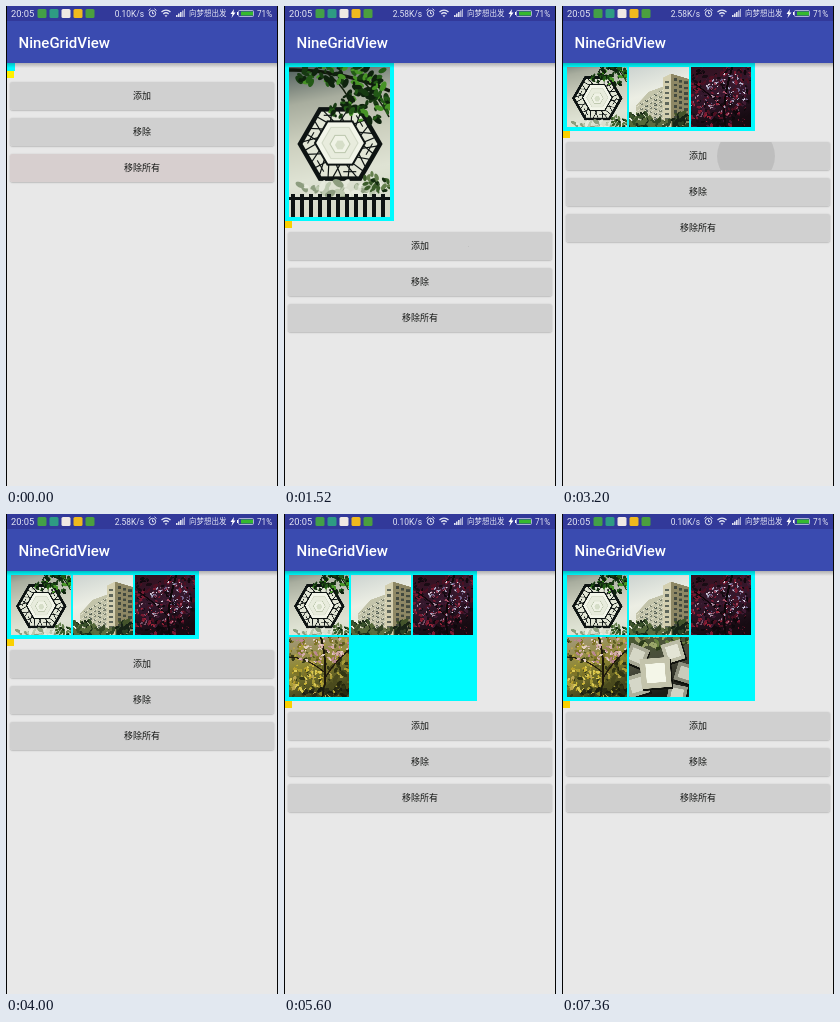
Recreate the animation shown at these times as an HTML page with a canvas. Size 272 px wide and 480 px high, loop 8 s.

```html
<!DOCTYPE html>
<html lang="zh">
<head>
<meta charset="utf-8">
<title>NineGridView</title>
<style>
  html, body { margin: 0; width: 100%; height: 100%; overflow: hidden; background: #e8e8e8; }
  #stage { position: relative; width: 272px; height: 480px; overflow: hidden; background: #e8e8e8;
    font-family: Roboto, "Noto Sans CJK SC", "Noto Sans CJK", sans-serif; }
  #stage > * { position: absolute; }
  #bars { left: 0; top: 0; z-index: 2; }
  #shade { top: 57px; width: 272px; height: 5px; z-index: 1;
    background: linear-gradient(rgba(0,0,0,.24), rgba(0,0,0,0)); }
  #grid { left: 1px; top: 57px; background: #00fbff; }
  #grid canvas { position: absolute; object-fit: cover; }
  #marker { left: 1px; width: 7px; height: 7px; }
  #buttons { left: 4px; width: 264px; }
  .lift { height: 28px; margin-bottom: 8px; border-radius: 2px; box-shadow: 0 .5px 1.5px rgba(0,0,0,.3); }
  .button { position: relative; height: 28px; border-radius: 2px; overflow: hidden;
    background: #d0d0d0; color: #141614; font-size: 9px; line-height: 28px; text-align: center; }
  #ripple { position: absolute; border-radius: 50%; background: #000; }
  .edge { top: 0; width: 1px; height: 480px; background: #050505; z-index: 3; }
</style>
</head>
<body>
<div id="stage">
  <svg id="bars" width="272" height="57" fill="#fff">
    <rect width="272" height="15" fill="#32399a"/>
    <rect y="15" width="272" height="42" fill="#3a4bb0"/>
    <text x="12.500" y="41.500" font-size="15" font-weight="500">NineGridView</text>
    <g fill="#e4e6f4">
      <text x="5" y="10.600" font-size="9.300">20:05</text>
      <text id="speed" x="138" y="10.500" font-size="8.400" text-anchor="end"></text>
      <text x="183" y="10.300" font-size="7.500">向梦想出发</text>
      <text x="251" y="10.500" font-size="8.200">71%</text>
    </g>
    <g id="badges"></g>
    <g fill="none" stroke="#dfe2f2">
      <circle cx="146.500" cy="7.500" r="3.200"/>
      <path d="M146.500 5.500v2.200h1.500M142.500 4.500l2-1.700M150.500 4.500l-2-1.700"/>
      <path d="M155.500 6a6.500 6.500 0 0 1 9 0M157.300 8a4 4 0 0 1 5.400 0" stroke-width="1.300"/>
      <rect x="232.500" y="4.500" width="15" height="6" rx="1" opacity=".7"/>
    </g>
    <path d="M158.500 9.300h3l-1.500 2zM170 9h1.600v2H170zM172 7.500h1.600V11H172zM174 6h1.600v5H174z" opacity=".85"/>
    <path d="M176 4.500h1.600V11H176zM178 3h1v8h-1z" opacity=".6"/>
    <path d="M228 3l-3.500 5h2l-1 4 4-5.500h-2z"/>
    <path d="M235 5.500h12v4h-12z" fill="#35b92f"/>
    <path d="M231 6h1v3h-1z"/>
  </svg>
  <div id="shade"></div>
  <div id="grid"></div>
  <div id="marker"></div>
  <div id="buttons">
    <div class="lift"><div class="button"><div id="ripple"></div>添加</div></div>
    <div class="lift"><div class="button">移除</div></div>
    <div class="lift"><div class="button" id="clear">移除所有</div></div>
  </div>
  <div class="edge" style="left:0"></div>
  <div class="edge" style="left:271px"></div>
</div>
<script>
const LOOP = 8000, PAD = 4, GAP = 2, TOP = 57;
const $ = id => document.getElementById(id);

// Each tap: when the grid changes, when its ripple starts, where, and the ripple's first radius
const TAPS = [
  { at: 80, ripple: 80, x: 180, r: 0 },
  { at: 1600, ripple: 1520, x: 180, r: 0 },
  { at: 3120, ripple: 3120, x: 180, r: 0 },
  { at: 4720, ripple: 4800, x: 180, r: 0 },
  { at: 6400, ripple: 6400, x: 180, r: 250 }
];

['#43a047', '#2e9b83', '#f0e9e4', '#efb91e', '#4b9f3e'].forEach((color, i) => {
  $('badges').insertAdjacentHTML('beforeend',
    `<rect x="${31.5 + 12 * i}" y="3" width="9" height="9" rx="1.500" fill="${color}"/>`);
});

function seeded(seed) {
  return () => {
    seed = (seed * 1664525 + 1013904223) >>> 0;
    return seed / 4294967296;
  };
}

function painter(w, h, seed) {
  const canvas = document.createElement('canvas');
  canvas.width = w * 2;
  canvas.height = h * 2;
  const g = canvas.getContext('2d'), rnd = seeded(seed);
  g.scale(2, 2);
  const p = {
    canvas, g,
    poly(points, fill, stroke, width = 1) {
      g.beginPath();
      points.forEach(([x, y]) => g.lineTo(x, y));
      g.closePath();
      if (fill) { g.fillStyle = fill; g.fill(); }
      if (stroke) { g.strokeStyle = stroke; g.lineWidth = width; g.stroke(); }
    },
    rect(x, y, w, h, fill) { g.fillStyle = fill; g.fillRect(x, y, w, h); },
    wash(...colors) {
      const fade = g.createLinearGradient(0, 0, w * .3, h);
      colors.forEach((c, i) => fade.addColorStop(i / (colors.length - 1), c));
      p.rect(0, 0, w, h, fade);
    },
    curve(x, y, cx, cy, ex, ey, color, width) {
      g.beginPath();
      g.moveTo(x, y);
      g.quadraticCurveTo(cx, cy, ex, ey);
      g.strokeStyle = color;
      g.lineWidth = width;
      g.stroke();
    },
    leaves(n, x, y, rx, ry, size, colors) {
      for (let i = 0; i < n; i++) {
        const a = rnd() * Math.PI * 2, d = Math.sqrt(rnd()), s = size * (.5 + rnd());
        g.fillStyle = colors[Math.floor(rnd() * colors.length)];
        g.beginPath();
        g.ellipse(x + Math.cos(a) * d * rx, y + Math.sin(a) * d * ry, s, s * .55, rnd() * 3, 0, 7);
        g.fill();
      }
    }
  };
  return p;
}

const hexagon = (x, y, r) => Array.from({ length: 6 }, (_, i) =>
  [x + r * Math.cos(i * Math.PI / 3), y + r * Math.sin(i * Math.PI / 3)]);

function latticeWindow() {
  const p = painter(101, 150, 7), ink = '#0d1312', greens = ['#0e220d', '#235a17', '#479426', '#173a12'];
  p.wash('#4f5d5b', '#a9ae9f', '#cdd0bf', '#dfe3d4', '#d5dac8');
  const outer = hexagon(51, 77, 40), inner = hexagon(51, 76, 25);
  p.poly(outer, '#e2e6d6', ink, 4.5);
  const mix = (u, v, k) => [u[0] + (v[0] - u[0]) * k, u[1] + (v[1] - u[1]) * k];
  outer.forEach((a, i) => {
    const b = outer[(i + 1) % 6], c = inner[i], d = inner[(i + 1) % 6];
    [[.05, .25], [.3, .12], [.45, .65], [.7, .5], [.8, .95]].forEach(([s, e]) =>
      p.poly([mix(a, b, s), mix(c, d, e)], null, ink, 1.2));
    p.poly([mix(a, c, .5), mix(mix(a, b, .4), mix(c, d, .4), .5)], null, ink, 1.1);
  });
  p.poly(inner, '#f2f5e9', ink, 2);
  p.poly(hexagon(51, 76, 18), '#e8ecdd', '#d2d9c6', 1);
  p.poly(hexagon(51, 77, 10), '#f0f3e6', '#bcc7ad', 1);
  p.poly(hexagon(51, 78, 5), '#d6dec8');
  p.leaves(45, 50, 121, 50, 7, 4, ['#bcc8ae', '#e6eadc', '#8d9d7f']);
  p.rect(0, 130, 101, 3, ink);
  for (let x = 2; x < 101; x += 9) p.rect(x, 127, 4, 23, ink);
  p.curve(0, 3, 50, 2, 101, 24, '#10180c', 3.5);
  p.curve(35, 4, 60, 22, 62, 42, '#14200f', 1.5);
  p.curve(70, 10, 90, 30, 100, 50, '#14200f', 1.5);
  p.leaves(60, 50, 8, 52, 10, 3.5, greens);
  p.leaves(85, 78, 32, 26, 24, 3.6, greens);
  p.leaves(22, 53, 42, 14, 8, 3, greens);
  p.leaves(30, 88, 115, 15, 10, 2.6, ['#3b5c2a', '#142c10', '#65804d']);
  return p.canvas;
}

function building() {
  const p = painter(90, 90, 21);
  p.wash('#ccd3d0', '#eceee4', '#e3e5d6');
  p.poly([[11, 57], [30, 37], [52, 29], [52, 90], [11, 90]], '#c3c4aa');
  p.poly([[51, 16], [63, 10], [63, 90], [51, 90]], '#d3cfb0');
  p.poly([[63, 10], [90, 18], [90, 90], [63, 90]], '#8e8865');
  for (let y = 0; y < 8; y++) {
    for (let x = 0; x < 5; x++) p.rect(17 + x * 7, 54 - x * 4.5 + y * 7, 4, 3.5, x % 2 ? '#5a6457' : '#7b8270');
    p.rect(54, 21 + y * 8, 6, 3.5, '#5e665b');
    for (let x = 0; x < 3; x++) p.rect(67 + x * 8, 17 + x * 2.3 + y * 8, 5, 4, '#434a3f');
    p.poly([[11, 60 + y * 7], [52, 34 + y * 7]], null, '#e3e2cd', .8);
  }
  p.leaves(75, 12, 81, 22, 14, 4, ['#1c2b18', '#38502a', '#55693a']);
  p.leaves(50, 78, 82, 16, 13, 4, ['#182417', '#2c4025', '#44542b']);
  p.leaves(24, 46, 86, 18, 6, 4, ['#344727', '#5c6c40']);
  return p.canvas;
}

function redTree() {
  const p = painter(90, 90, 33);
  p.wash('#34111f', '#35182d', '#160b12');
  p.leaves(330, 45, 45, 65, 60, 3, ['#4c1022', '#781a31', '#180c14', '#3f1a33', '#0f080d']);
  p.curve(52, 90, 45, 55, 62, 0, '#0c0709', 3);
  p.curve(48, 60, 25, 38, 5, 25, '#10070b', 2);
  p.leaves(100, 53, 40, 32, 32, 1.5, ['#a9a8c2', '#6f6088', '#ddd6e4', '#a34a63']);
  p.leaves(45, 22, 62, 25, 22, 1.5, ['#7a526a', '#ad8fa2', '#9d2438']);
  return p.canvas;
}

function blossom() {
  const p = painter(90, 90, 45);
  p.wash('#a59a80', '#8f8834', '#42441b');
  p.leaves(260, 45, 45, 65, 60, 3.5, ['#a89c35', '#5f6022', '#363917', '#baa550', '#7e7426']);
  p.leaves(45, 78, 65, 20, 30, 4, ['#26280f', '#343714', '#4a4a1d']);
  p.curve(50, 90, 60, 50, 48, 0, '#1c170b', 3);
  p.curve(55, 60, 70, 35, 90, 20, '#211a0d', 2);
  p.curve(52, 52, 25, 30, 0, 30, '#241c0e', 1.8);
  p.leaves(85, 48, 20, 52, 22, 2.3, ['#d3aba9', '#b98691', '#e3cfc3']);
  p.leaves(50, 24, 60, 28, 22, 2.3, ['#cfba35', '#b8a02c', '#dccb55']);
  p.leaves(35, 66, 84, 45, 8, 4, ['#2a2b14', '#1a1c0e']);
  return p.canvas;
}

function cards() {
  const p = painter(90, 90, 57);
  p.wash('#4a5a31', '#4a4c3d', '#1b1d17');
  p.leaves(45, 42, 6, 50, 11, 4, ['#6a8240', '#2b3b1a', '#99a568']);
  const card = (x, y, size, turn, fill, face) => {
    p.g.save();
    p.g.translate(x, y);
    p.g.rotate(turn);
    p.rect(-size / 2 + 2, -size / 2 + 3, size, size, '#10120d');
    p.rect(-size / 2, -size / 2, size, size, fill);
    p.rect(-size * .32, -size * .32, size * .64, size * .64, face);
    p.g.restore();
  };
  card(12, 28, 30, .4, '#a9aa96', '#d5d7c6');
  card(66, 22, 30, -.3, '#bcbda6', '#e3e5d5');
  card(84, 54, 28, .3, '#8b8d7c', '#c9cbbb');
  card(12, 72, 32, -.3, '#aeb09b', '#d5d7c8');
  card(72, 86, 28, .2, '#97998a', '#d2d4c5');
  card(40, 54, 45, -.08, '#c4c4ac', '#f4f6e8');
  return p.canvas;
}

const photos = [latticeWindow(), building(), redTree(), blossom(), cards()];
$('grid').append(...photos);

function layout(count) {
  const cols = Math.min(count, 3), rows = Math.ceil(count / 3);
  const [w, h] = count === 1 ? [101, 150] : count === 2 ? [90, 90] : [60, 60];
  const span = (n, size) => PAD * 2 + n * size + Math.max(0, n - 1) * GAP;
  const height = span(rows, h);
  Object.assign($('grid').style, { width: span(cols, w) + 'px', height: height + 'px' });
  photos.forEach((photo, i) => Object.assign(photo.style, {
    display: i < count ? 'block' : 'none',
    left: PAD + (i % 3) * (w + GAP) + 'px',
    top: PAD + Math.floor(i / 3) * (h + GAP) + 'px',
    width: w + 'px', height: h + 'px'
  }));
  $('marker').style.top = TOP + height + 'px';
  $('marker').style.background = count ? '#fad000' : '#fff000';
  $('buttons').style.top = TOP + height + 11 + 'px';
  $('clear').style.background = count ? '' : '#d7cfcf';
}

function ripple(t) {
  const tap = TAPS.filter(tap => t >= tap.ripple).pop();
  const age = tap ? t - tap.ripple : LOOP;
  const r = tap ? tap.r + age * .363 : 0;
  const fade = Math.max(0, Math.min(1, (560 - age) / 400));
  Object.assign($('ripple').style, {
    left: (tap ? tap.x : 0) - r + 'px', top: 14 - r + 'px',
    width: r * 2 + 'px', height: r * 2 + 'px',
    opacity: fade * (tap && tap.r ? .05 : .085)
  });
}

let shown = -1;
function render(t) {
  const count = TAPS.filter(tap => t >= tap.at).length;
  if (count !== shown) layout(shown = count);
  $('speed').textContent = t >= 640 && t < 4720 ? '2.58K/s' : '0.10K/s';
  ripple(t);
}

const start = performance.now();
function tick() {
  render((performance.now() - start) % LOOP);
  requestAnimationFrame(tick);
}
tick();
</script>
</body>
</html>
```
